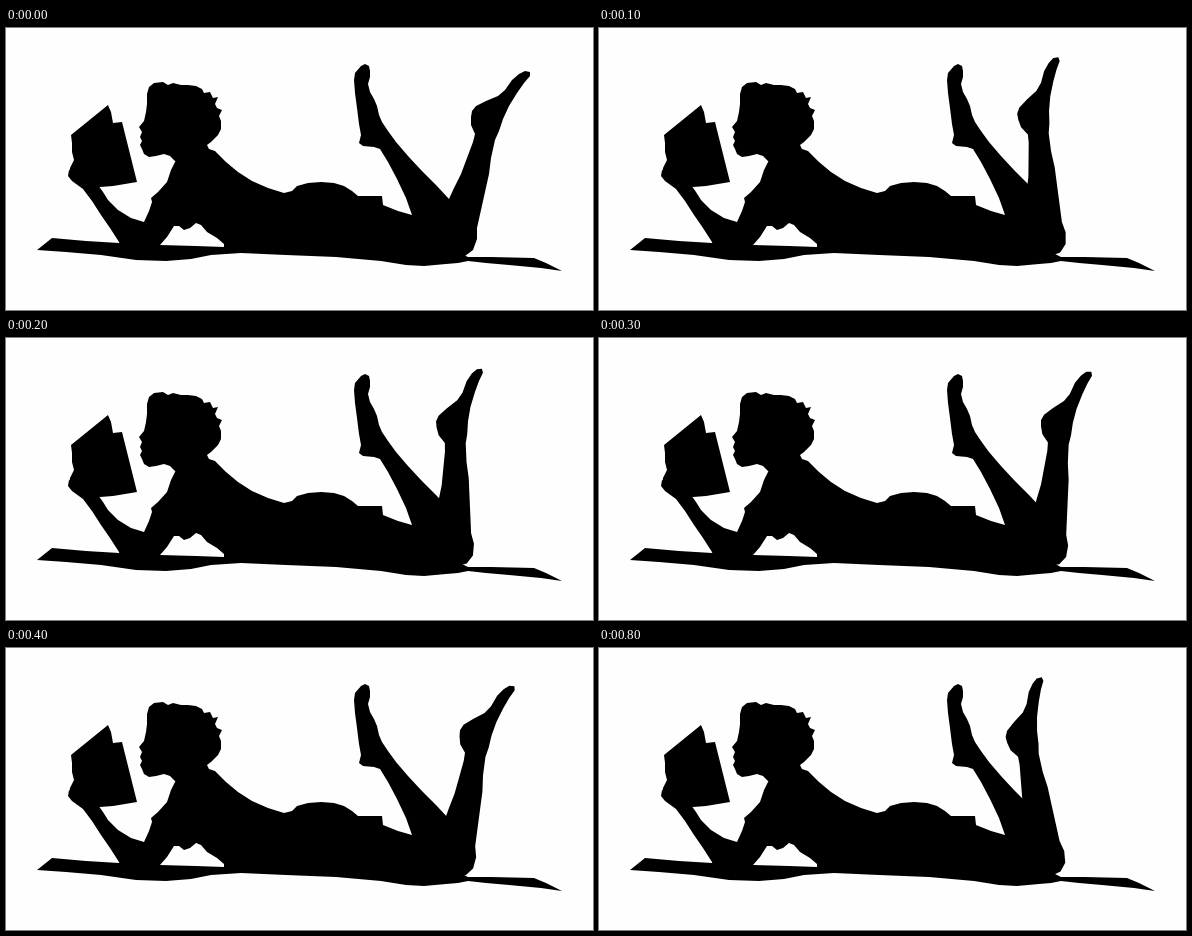
Animation, 587 px wide and 282 px high, one loop 1000 ms. Source, as an HTML page with a canvas:

```html
<!DOCTYPE html>
<html lang="en">
<head>
<meta charset="utf-8">
<title>Reading on a mat</title>
<style>
html, body { margin: 0; width: 100%; height: 100%; overflow: hidden; background: #fefefe; }
canvas { display: block; }
</style>
</head>
<body>
<canvas id="stage" width="587" height="282"></canvas>
<script>
const ctx = document.getElementById('stage').getContext('2d');
const INK = '#000';
const PAPER = '#fefefe';
const KNEE = [450, 220];
const STEP_MS = 100;
const LOOP_MS = 1000;

// Builds a closed outline from "x,y x,y ..." points.
const shape = points => new Path2D('M' + points.trim().split(/\s+/).join('L') + 'Z');

const mat = shape(`31,222 46,210 80,213 113,215 154,217 218,218 300,212 400,215 456,226
  462,229 485,229 528,230 540,235 556,243 535,240 503,237 480,235 462,233 452,235 440,236
  418,238 400,237 375,233 330,229 280,227 235,225 205,227 185,231 160,233 130,232 95,227 60,224`);

const book = shape(`65,107 102,77 105,84 107,95 116,94 131,154 119,156 107,158 94,159
  70,155 63,147 64,140 68,132 66,124 66,115`);

const forearm = shape(`63,142 62,148 66,153 77,161 86,173 95,187 104,200 113,214 114,218
  155,218 150,205 138,194 125,190 112,182 102,172 97,164 92,157`);

const head = shape(`141,76 141,66 143,59 148,55 157,54 162,57 167,55 175,57 182,57 190,58
  196,61 198,65 204,64 207,70 212,69 209,76 211,80 216,82 213,88 215,93 215,101 212,107
  205,114 201,117 203,121 209,123 200,140 169,133 164,128 158,126 150,128 143,129 138,126
  136,121 134,117 136,113 134,109 136,104 133,99 138,93 140,84`);

const torso = shape(`171,130 209,123 220,134 232,144 246,153 262,160 278,165 286,163 291,158
  302,155 315,154 328,155 338,158 346,163 352,168 362,168 376,168 377,177 392,183 406,187
  443,171 450,190 457,222 452,233 400,235 330,227 235,224 130,225 130,206 138,194 143,183
  146,174 145,170 152,164 161,154 165,142`);

const armGap = shape(`154,217 161,209 168,198 173,198 178,202 184,200 190,195 195,197
  201,204 211,210 218,216 218,219 190,218`);

const stillLeg = shape(`406,187 400,170 391,151 382,134 374,121 368,119 357,118 353,115
  355,107 353,96 351,80 349,65 348,52 349,45 355,38 359,36 363,38 364,43 364,49 362,56
  364,64 368,71 371,78 373,87 376,94 382,103 390,114 402,128 415,142 430,157 443,171 440,200`);

const swingLeg = shape(`524,44 519,43 513,46 506,52 499,62 492,68 480,73 470,78 466,83
  465,89 465,97 469,106 467,114 461,130 455,146 448,160 443,171 434,190 425,212 442,228
  459,228 467,222 471,211 471,200 475,182 479,164 483,146 485,130 489,112 493,103 497,91
  503,78 511,65 518,55 524,48`);

function fill(path, color = INK) {
  ctx.fillStyle = color;
  ctx.fill(path);
}

// The leg kicks forward, eases back in 5 degree steps, then rests forward.
function legAngle(ms) {
  const step = Math.min(5, Math.floor(ms / STEP_MS));
  if (step === 0) return 0;
  return step === 5 ? -25 : -25 + 5 * step;
}

function draw(ms) {
  ctx.fillStyle = PAPER;
  ctx.fillRect(0, 0, 587, 282);
  [mat, book, forearm, head, torso, stillLeg].forEach(p => fill(p));
  fill(armGap, PAPER);

  ctx.save();
  ctx.translate(KNEE[0], KNEE[1]);
  ctx.rotate(legAngle(ms) * Math.PI / 180);
  ctx.translate(-KNEE[0], -KNEE[1]);
  fill(swingLeg);
  ctx.restore();
}

const start = performance.now();
function tick() {
  draw((performance.now() - start) % LOOP_MS);
  requestAnimationFrame(tick);
}
tick();
</script>
</body>
</html>
```
